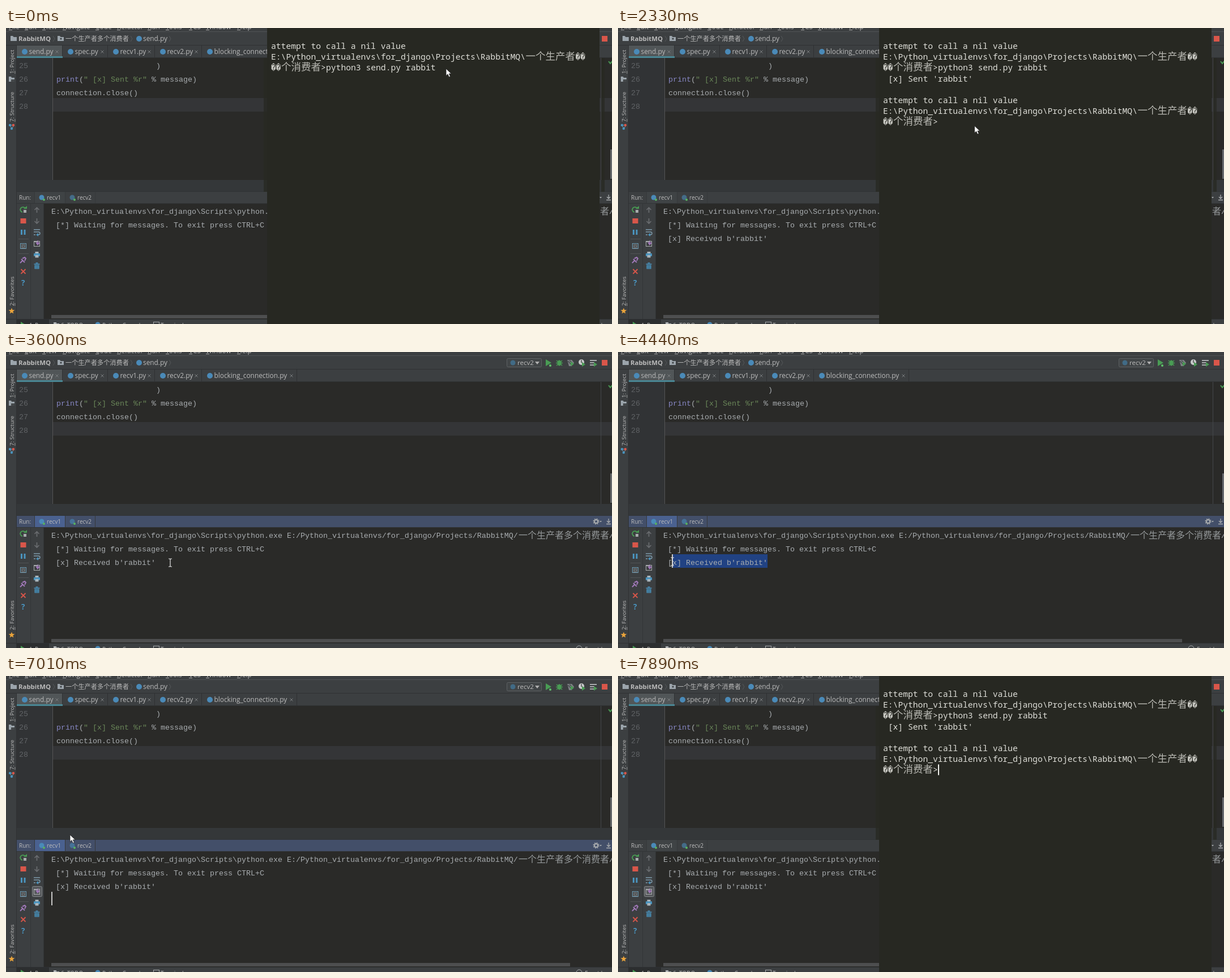
These frames come from a looping animation (1070x524 px, 8 s). An HTML page:

```html
<!DOCTYPE html>
<html lang="zh">
<head>
<meta charset="utf-8">
<title>Sending a message to two consumers</title>
<style>
html, body { margin: 0; width: 100%; height: 100%; overflow: hidden; background: #2a2a28; }
svg { display: block; width: 100vw; height: 100vh; }
text { white-space: pre; }
.ui { font-family: "Open Sans", "Noto Sans", "Noto Sans CJK SC", sans-serif; fill: #bbb; }
.code { font-family: "Liberation Mono", "Noto Sans CJK SC", monospace; font-size: 13.33px; }
.term { font-family: "Noto Sans Mono", "DejaVu Sans Mono", monospace; font-size: 14.68px; fill: #deded8; }
.bad { font-family: "DejaVu Sans Mono", monospace; font-size: 14.63px; fill: #c8c8c2; }
.cjk { font-family: "Noto Sans CJK SC", "Noto Sans CJK", sans-serif; font-weight: 300; }
</style>
</head>
<body>
<svg id="stage" viewBox="0 0 1070 524" preserveAspectRatio="none"></svg>
<script>
const LOOP = 8000;
const PANEL = '#3c3f41', DARK = '#2a2a28', GREY = '#9a9da0', GUTTER = '#313335';
const GREEN = '#499c54', RED = '#d9564a', BLUE = '#4a93bd', PY = '#4a8ab8', INK = '#a9adb0';

const rect = (x, y, w, h, fill, more = '') =>
  `<rect x="${x}" y="${y}" width="${w}" height="${h}" fill="${fill}" ${more}/>`;
const path = (d, fill, stroke = 'none', width = 1.5) =>
  `<path d="${d}" fill="${fill}" stroke="${stroke}" stroke-width="${width}"/>`;
const dot = (x, y, r, fill) => `<circle cx="${x}" cy="${y}" r="${r}" fill="${fill}"/>`;
const text = (cls, x, y, str, more = '') => `<text class="${cls}" x="${x}" y="${y}" ${more}>${str}</text>`;
const ui = (x, y, str, size = 11.85, more = '') => text('ui', x, y, str, `font-size="${size}" ${more}`);
const code = (x, y, str, fill = INK) => text('code', x, y, str, `fill="${fill}"`);
const group = (id, body) => `<g id="${id}">${body}</g>`;
const cross = (x, y, r, c, w) => path(`M${x - r} ${y - r}l${2 * r} ${2 * r}m0 ${-2 * r}l${-2 * r} ${2 * r}`, 'none', c, w);
const folder = (x, y) => path(`M${x} ${y}h4l1.5 2h5.5v7h-11z`, '#9ba4ab');
const chevron = x => path(`M${x} 14l3 5l-3 5`, 'none', '#55585a', 1);

function menuBar() {
  const items = [[5, 'File'], [33, 'Edit'], [64, 'View'], [100, 'Navigate'], [158, 'Code'], [196, 'Refactor'],
    [250, 'Run'], [282, 'Tools'], [323, 'VCS'], [353, 'Window'], [408, 'Help']];
  return rect(0, 0, 1070, 53, PANEL) +
    items.map(([x, s]) => ui(x, 2, s) + rect(x, 3, 6, 1, '#aaa')).join('') +
    rect(0, 6, 1070, 1, '#505355') + rect(0, 30, 1070, 1, '#2f3133');
}

function navBar() {
  return folder(8, 14) + ui(22, 23, 'RabbitMQ', 11.4, 'font-weight="700"') + chevron(83) +
    folder(91, 14) + dot(97, 19, 1.5, '#34383a') + ui(105, 23, '一个生产者多个消费者', 11.2) + chevron(220) +
    dot(235, 19, 5, PY) + ui(242, 23, 'send.py') + chevron(288) +
    rect(884.5, 11.5, 61, 15, '#414547', 'stroke="#5e6163" rx="2"') +
    dot(895, 19, 4.5, '#416b86') + ui(903, 23, 'recv2', 11.6) + path('M934 17h8l-4 5z', '#b0b0b0') +
    path('M953 13l10 6l-10 6z', GREEN) + dot(961, 24, 2, '#5fc46a') +
    path('M972 15l10 9m0 -9l-10 9m-1 -4.500h12', 'none', GREEN, 1.5) +
    `<ellipse cx="977" cy="19.500" rx="3.500" ry="5" fill="${GREEN}"/>` +
    path('M991 14h8l4 5l-4 6h-5z', '#7d8184') + path('M992 16l8 8m-5 -9l6 6', 'none', '#454a4c') +
    path('M997 17l6 4l-6 4z', GREEN) +
    dot(1016, 18, 5, '#c7c9ca') + path('M1016 14v4l3 2', 'none', '#555') + path('M1017 18l6 4l-6 4z', GREEN) +
    path('M1031 15h12m-12 4h8m-8 4h7', 'none', '#a9acae', 2) + path('M1038 18l6 4l-6 4z', GREEN) +
    rect(1052, 14, 10, 10, RED);
}

function editorTabs() {
  const tabs = [[19, 100, 'send.py'], [100, 180, 'spec.py'], [180, 263, 'recv1.py'],
    [263, 346, 'recv2.py'], [346, 514, 'blocking_connection.py']];
  return tabs.map(([a, b, s], i) => {
    const x = i ? a + 8 : 27;
    return rect(a, 31, b - a, 22, i ? PANEL : '#515658') + rect(b - 1, 31, 1, 22, '#2f3133') +
      dot(x + 6, 42, 5, PY) + ui(x + 13.5, 46, s) + cross(b - 10, 42, 2.5, '#7b7e80', 1);
  }).join('') + rect(19, 52, 1051, 1, '#2f3133') + rect(19, 50, 81, 3, '#4a8794');
}

function editor() {
  const nums = [25, 26, 27, 28].map((n, i) => code(23, 71 + 24 * i, n, '#606366')).join('');
  return rect(19, 53, 1051, 216, DARK) + rect(19, 53, 63, 216, GUTTER) +
    rect(83, 124, 987, 24, '#343537') + rect(82, 53, 1, 216, '#555') + rect(1050, 53, 1, 216, '#45474a') + nums +
    code(265, 71, ')') + code(89, 95, 'print', '#8888c6') + code(129, 95, '(') +
    code(137, 95, '" [x] Sent %r"', '#6a8759') + code(257, 95, '% message)') + code(89, 119, 'connection.close()') +
    path('M1064 59l3 4l5 -6', 'none', GREEN, 2) + rect(1067, 215, 3, 52, '#66696b') +
    rect(19, 269, 1051, 21, '#343739') + rect(19, 289, 1051, 1, '#303335');
}

function sideStrip() {
  const side = (y, s) => `<g transform="translate(14 ${y}) rotate(-90)">${ui(0, 0, s, 9.8)}${rect(0, 1.5, 5, 0.8, '#aaa')}</g>`;
  const star = Array.from({ length: 10 }, (_, i) => {
    const r = i % 2 ? 2.4 : 5.6, a = (i / 5 - 0.5) * Math.PI;
    return `${10 + r * Math.cos(a)},${501 + r * Math.sin(a)}`;
  }).join(' ');
  return rect(0, 31, 18, 493, PANEL) + rect(18, 31, 1, 493, '#2f3133') +
    side(81, '1: Project') + path('M5 86h4l1 2h5v7h-10z', '#9ba4ab') + rect(9, 91, 6, 4, '#45494b') +
    side(166, '7: Structure') + path('M7 172h7l-3.500 6z', 'none', '#8a9aa5', 1) +
    dot(7, 172, 2.2, BLUE) + dot(13, 172, 2.2, RED) + dot(10, 178, 2.2, BLUE) +
    side(492, '2: Favorites') + `<polygon points="${star}" fill="#e9a33b"/>`;
}

function runTools() {
  const sep = y => rect(22, y, 18, 1, '#515456');
  return rect(19, 310, 48, 206, PANEL) + rect(43, 311, 1, 205, '#323537') + rect(66, 311, 1, 205, '#323537') +
    rect(31, 322, 5, 5, '#a7aaac') + path('M29 326a4.500 4.500 0 1 1 5 -6', 'none', GREEN, 1.8) + path('M31 320h6v-5z', GREEN) +
    rect(25.5, 337, 10, 9, RED) + rect(26, 357, 3, 9, BLUE) + rect(31.5, 357, 3, 9, BLUE) + sep(373) +
    rect(25.5, 381.5, 10, 9, 'none', 'stroke="#6f9db5"') + path('M27 384h7m-7 2.500h3m1 0h3m-7 2.500h7', 'none', GREY, 1) + sep(399) +
    path('M25 416l4 -4m-2 -3l6 6m-4 -7l4 -2l2 2l-2 4', 'none', '#a078b8', 2) +
    cross(30.5, 431, 4, RED, 1.8) + ui(27, 456, '?', 13.5, `font-weight="700" style="fill:${BLUE}"`) +
    path('M54.500 327v-9m-4 4l4 -4l4 4m-4 15v9m-4 -4l4 4l4 -4', 'none', '#6a6d70', 1.7) +
    path('M49 357h11m-11 4h8q3 0 3 2.500t-3 2.500h-2m-6 0h3', 'none', '#7d9aaa', 1.4) + path('M57 363v6l-4 -3z', BLUE) +
    group('follow', rect(46.5, 372.5, 17, 18, '#55585b', 'rx="2" stroke="#85888a"')) +
    rect(49.5, 377.5, 10, 9, 'none', 'stroke="#a9acae"') + rect(49, 377, 8, 2, '#a9acae') +
    path('M56 376v5m-3 -1l3 4l3 -4z', '#a078b8', '#a078b8', 1.2) +
    rect(51.5, 396, 6, 3, '#a9b5bc') + rect(49, 399, 11, 5, BLUE) + rect(51.5, 402, 6, 4.5, '#a9b5bc') +
    path('M49.500 418h10m-7 -2h4', 'none', BLUE, 1.4) + rect(50.5, 419.5, 8, 7, BLUE) +
    path('M52.500 420v6m2 -6v6m2 -6v6', 'none', '#365a6c', 0.8);
}

function runHeader() {
  const tab = (n, x) => dot(x + 13, 300, 4.5, PY).replace('<circle', `<circle id="icon${n}"`) +
    dot(x + 17, 304, 2, '#58b35f') + ui(x + 22, 304, 'recv' + n, 10);
  return rect(19, 290, 1051, 20, PANEL, 'id="head"') + rect(50, 290, 54, 20, PANEL, 'id="tab"') +
    rect(50, 290, 1, 20, '#36393b') + rect(104, 290, 1, 20, '#36393b') + rect(157, 290, 1, 20, '#36393b') +
    ui(23, 304, 'Run:', 10) + tab(1, 50) + tab(2, 104) +
    `<circle cx="1042" cy="300" r="3" fill="none" stroke="#a9acae" stroke-width="2"/>` +
    `<circle cx="1042" cy="300" r="4.800" fill="none" stroke="#a9acae" stroke-width="1.500" stroke-dasharray="1.900 1.870"/>` +
    path('M1048 299h4l-2 2.500z', '#a9acae') + path('M1064 295v7m-3 -3l3 3l3 -3m-7 5.500h8', 'none', '#a9acae', 1.3) +
    rect(19, 310, 1051, 1, '#323537');
}

function runConsole() {
  return rect(67, 311, 1003, 205, DARK) + rect(96, 358, 168, 24, '#214283', 'id="sel"') +
    code(80, 329, 'E:\\Python_virtualenvs\\for_django\\Scripts\\python.exe E:/Python_virtualenvs/for_django/Projects/RabbitMQ/') +
    text('cjk', 905, 330, '一个生产者多个消费者', 'font-size="16" fill="#95999b"') + code(1065, 329, '/') +
    code(80, 353, ' [*] Waiting for messages. To exit press CTRL+C') +
    group('got', code(80, 377, " [x] Received b'rabbit'")) +
    rect(80, 358, 2, 24, '#c8c8c8', 'id="caret"') + rect(80, 508, 916, 6, '#4d4e4f');
}

function bottomBar() {
  return rect(0, 515, 1070, 1, '#2f3133') + rect(19, 516, 1051, 8, PANEL) + rect(19, 516, 57, 8, '#2c2e2f') +
    path('M26 520l8 5l-8 5z', GREEN) + ui(40, 530, '4: Run', 10) +
    path('M84 521h5v2h5v4h-10z', '#b0b3b5') + ui(97, 530, '6: TODO', 10) +
    dot(162, 525, 4.5, PY) + ui(170, 530, 'Python Console', 10) +
    rect(260.5, 520.5, 10, 8, 'none', 'stroke="#a9acae"') + ui(273, 530, 'Terminal', 10) +
    `<circle cx="1012" cy="525" r="5" fill="none" stroke="#a9acae"/>` + ui(1022, 530, 'Event Log', 10);
}

function terminal() {
  const row = n => 37 + 19.2 * n;
  const term = (x, n, s) => text('term', x, row(n), s);
  const cjk = (x, n, s) => text('cjk', x, row(n), s, 'font-size="17.500" fill="#b9b9b3"');
  const bad = (x, n) => text('bad', x, row(n), '\uFFFD\uFFFD');
  const prompt = n => term(468, n, 'attempt to call a nil value') +
    term(468, n + 1, 'E:\\Python_virtualenvs\\for_django\\Projects\\RabbitMQ\\') +
    cjk(917.5, n + 1, '一个生产者') + bad(1005.5, n + 1) +
    bad(468, n + 2) + cjk(486, n + 2, '个消费者') + term(556, n + 2, '&gt;');
  const edges = rect(455, 53, 6, 237, '#272822', 'opacity="0.75"') + rect(1051, 53, 6, 237, '#272822', 'opacity="0.75"');
  return edges + rect(461, 0, 587, 524, '#272822') + prompt(0) + term(565, 2, 'python3 send.py rabbit') +
    group('sent', term(468, 3, " [x] Sent 'rabbit'")) + group('again', prompt(5)) +
    rect(758, 60, 2, 19, '#f4f4f0', 'id="tcaret"');
}

document.getElementById('stage').innerHTML =
  rect(0, 0, 1070, 524, PANEL) + menuBar() + navBar() + editorTabs() + editor() + sideStrip() +
  runConsole() + runTools() + runHeader() + bottomBar() + group('term', terminal()) +
  group('arrow', path('M0 0v12.500l3 -2.800l2.200 5l2.300 -1l-2.200 -4.800h4z', '#fff', '#222', 0.8)) +
  group('beam', path('M-3 -7h2l1 1l1 -1h2m-6 14h2l1 -1l1 1h2m-3 -13v12', 'none', '#e4e4e4', 1.2));

const $ = Object.fromEntries([...document.querySelectorAll('[id]')].map(e => [e.id, e]));
// Unset rather than "visible", so that children stay hidden with their group
const show = (el, on) => on ? el.removeAttribute('visibility') : el.setAttribute('visibility', 'hidden');
const put = (el, attrs) => { for (const k in attrs) el.setAttribute(k, attrs[k]); };

// Pointer legs: first step, last step, number of steps, end point
const legs = [
  [1940, 2900, 8, 311, 392], [3050, 3350, 3, 290, 373], [3740, 3990, 3, 264, 372],
  [4140, 4440, 3, 96, 371], [4560, 4830, 3, 330, 395], [4960, 5100, 2, 293, 396],
  [5250, 5680, 4, 139, 301], [6100, 6370, 3, 76, 300], [6900, 7030, 2, 150, 262],
  [7160, 7430, 3, 372, 532]
];
const ease = u => u * u * (3 - 2 * u);

function pointer(t) {
  let x = 777, y = 72;
  for (const [a, b, n, ex, ey] of legs) {
    if (t < a) break;
    const k = Math.min(n, 1 + Math.floor((t - a) / (b - a) * (n - 1) + 1e-6));
    const u = ease(k / n);
    x += (ex - x) * u;
    y += (ey - y) * u;
  }
  return [x, y];
}

function draw(t) {
  const within = (a, b) => t >= a && t < b;
  const term = t < 3600 || t >= 7890;
  const focus = within(3600, 7740);
  const second = within(5820, 6770);
  const [px, py] = pointer(t);

  show($.term, term);
  show($.sent, term && t >= 830);
  show($.again, term && t >= 1390);
  const spot = t < 830 ? [758, 60] : t < 1390 ? [468, 80] : [565, 156.5];
  put($.tcaret, { x: spot[0], y: spot[1] });
  show($.tcaret, within(120, 680) || within(830, 1390) || within(1540, 2080) || within(2630, 3150) || t >= 7890);

  put($.head, { fill: focus ? '#434f69' : PANEL });
  put($.tab, { x: second ? 104 : 50, fill: focus ? '#4a6190' : '#3f4345' });
  put($.icon1, { opacity: second ? 0.6 : 1 });
  put($.icon2, { opacity: second ? 1 : 0.6 });

  show($.got, t >= 1660 && !second);
  show($.follow, t >= 5100);
  const left = t < 4440 ? Math.min(264, Math.max(96, 96 + 8 * Math.round((px - 96) / 8))) : 96;
  put($.sel, { x: left, width: 264 - left });
  show($.sel, within(4140, 5100));
  put($.caret, { x: within(4140, 5100) ? left - 1 : 80, y: t < 5100 || second ? 358 : 382 });
  show($.caret, within(4140, 4700) || within(5100, 5540) || within(5820, 6240) || within(6770, 7300));

  const inside = px > 82 && px < (term ? 461 : 1050) && ((py > 312 && py < 507) || (py > 53 && py < 268));
  const at = { transform: `translate(${px} ${py})` };
  put($.arrow, at);
  put($.beam, at);
  show($.arrow, !inside && t < 7430);
  show($.beam, inside && t < 7430);
}

const start = performance.now();
function tick() {
  draw((performance.now() - start) % LOOP);
  requestAnimationFrame(tick);
}
tick();
</script>
</body>
</html>
```
